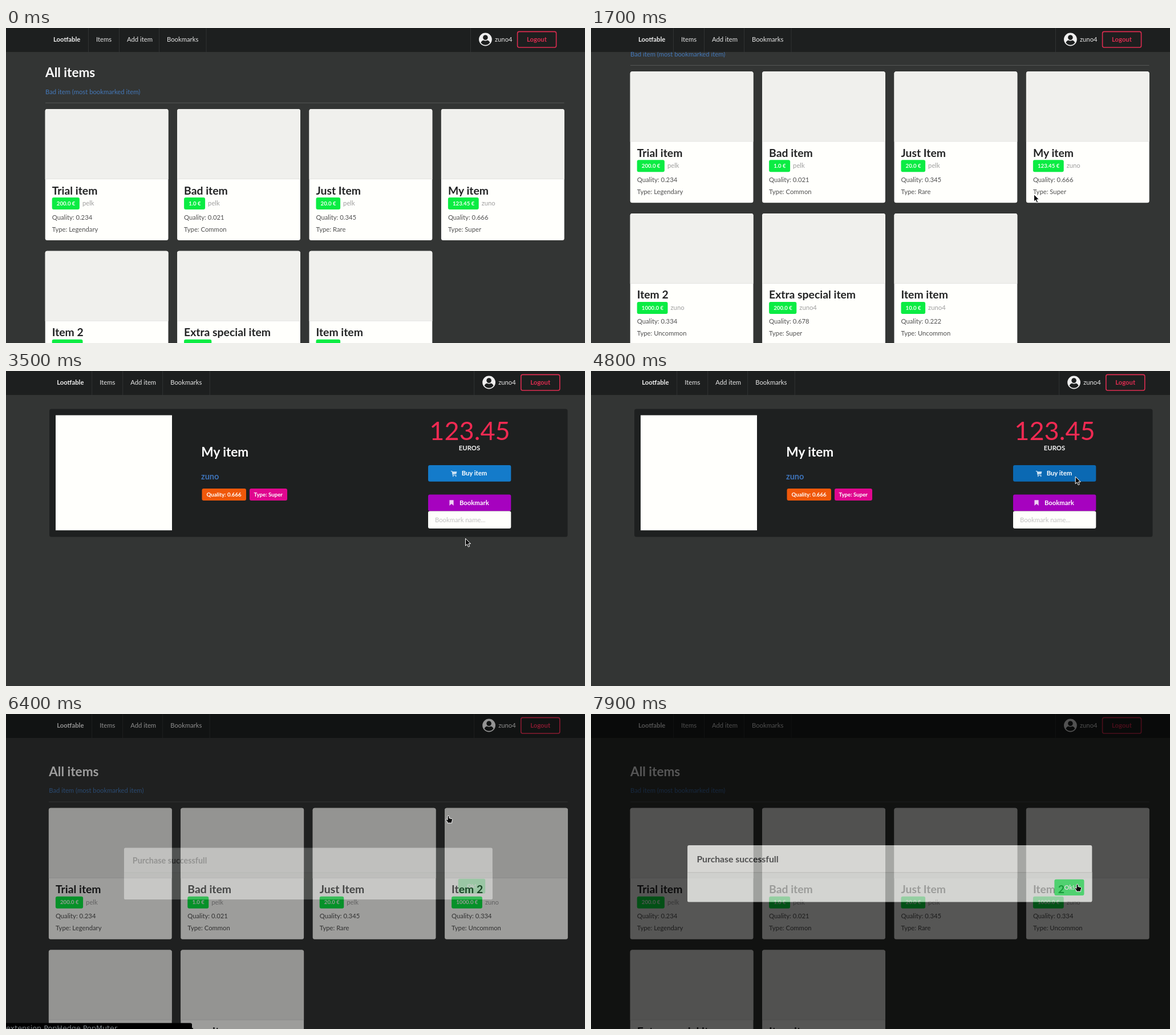
An HTML page for the animation above (8 s loop, 1015x552 px).

```html
<!DOCTYPE html>
<html lang="en">
<head>
<meta charset="utf-8">
<title>Item market</title>
<style>
  html, body { margin: 0; width: 100%; height: 100%; overflow: hidden; background: #333534; }
  svg { display: block; width: 1015px; height: 552px; }
  text { font-family: Lato, sans-serif; font-size: 11.28px; white-space: pre; }
  .b { font-weight: 700; }
  .mid { text-anchor: middle; }
  .h1 { font-size: 22.57px; }
  .h2 { font-size: 19.35px; }
  .h3 { font-size: 16.12px; }
  .h4 { font-size: 14.5px; }
  .tag { font-size: 9.67px; }
  .price { font-size: 45.1px; }
  #statusText { font-family: "DejaVu Sans", sans-serif; font-size: 12.75px; }
</style>
</head>
<body>
<svg id="stage" viewBox="0 0 1015 552" xmlns="http://www.w3.org/2000/svg"></svg>
<script>
const LOOP = 8000, STEP = 100, MAX_SCROLL = 68.7;
const PAGE = '#333534', INK = '#222324', LINK = '#2461b5', PAPER = '#fffffc';
const SHOP = 3300, BOUGHT = 6200, CLOSE = 7700;
const $ = id => document.getElementById(id);

const text = (x, y, str, fill, cls = '', extra = '') =>
  `<text x="${x}" y="${y}" fill="${fill}" class="${cls}" ${extra}>${str}</text>`;
const rect = (x, y, w, h, fill, r = 0, extra = '') =>
  `<rect x="${x}" y="${y}" width="${w}" height="${h}" fill="${fill}" rx="${r}" ${extra}/>`;

const ITEMS = [
  ['Trial item', '200.0', 'pelk', '0.234', 'Legendary'],
  ['Bad item', '1.0', 'pelk', '0.021', 'Common'],
  ['Just Item', '20.0', 'pelk', '0.345', 'Rare'],
  ['My item', '123.45', 'zuno', '0.666', 'Super'],
  ['Item 2', '1000.0', 'zuno', '0.334', 'Uncommon'],
  ['Extra special item', '200.0', 'zuno4', '0.678', 'Super'],
  ['Item item', '10.0', 'zuno4', '0.222', 'Uncommon']
];
const cardX = i => 68.7 + (i % 4) * 231.4;
const cardY = i => 142 + Math.floor(i / 4) * 248.7;

function card([name, price, seller, quality, type], i) {
  // label width: padding plus tabular digits, dot, space and euro sign
  const w = 16.1 + 9.67 * (0.58 * (price.length - 1) + 1);
  return `<g transform="translate(${cardX(i)} ${cardY(i)})">` +
    rect(0, 0, 215.8, 230, PAPER, 3.5) +
    `<path d="M0 122.5V3.5Q0 0 3.5 0H212.3Q215.8 0 215.8 3.5V122.5Z" fill="#f0f0ed"/>` +
    rect(0, 122, 215.8, 1, '#e3e3e1') +
    text(12, 149.5, name, INK, 'b h2 name') +
    rect(12, 155, w, 21, '#0bec43', 3) +
    text(20.1, 168.7, price + ' €', '#f4fff4', 'b tag') +
    text(12 + w + 5, 169, seller, '#9f9f9f') +
    text(12, 193.5, 'Quality: ' + quality, '#505050') +
    text(12, 214.5, 'Type: ' + type, '#505050') + '</g>';
}

const list = (id, items) => `<g id="${id}">` +
  text(69, 86, 'All items', '#fff', 'b h1') +
  text(69, 115.5, 'Bad item (most bookmarked item)', '#4478b9') +
  rect(69, 130.7, 909.5, 1, '#555756') + items.map(card).join('') + '</g>';

const nav = rect(0, 0, 1015, 42, '#1d1f1f') + '<g id="nav">' +
  [144.5, 198.5, 268.5, 351, 814.5].map(x => rect(x - 0.5, 0, 1, 42, '#313333')).join('') +
  text(83, 24, 'Lootfable', '#f0f0f0', 'b') +
  text(158, 24, 'Items', '#e6e6e6') + text(212, 24, 'Add item', '#e6e6e6') +
  text(282, 24, 'Bookmarks', '#e6e6e6') +
  `<circle cx="840.4" cy="20" r="11.4" fill="#f0f0f0"/>
   <circle cx="840.4" cy="16.6" r="4.3" fill="#1d1f1f"/>
   <path d="M832.4 25.6Q834 22 837 21.6Q840.4 23.4 843.8 21.6Q846.8 22 848.4 25.6A9.8 9.8 0 0 1 832.4 25.6Z" fill="#1d1f1f"/>` +
  text(857, 23.7, 'zuno4', '#e6e6e6') +
  rect(896.6, 6.4, 68, 27.6, 'none', 3, 'stroke="#dd2c50" stroke-width="1.6"') +
  text(930.5, 24, 'Logout', '#dd2c50', 'b mid') + '</g>';

const detail = '<g id="detail">' +
  rect(76, 66.4, 908.5, 224.3, '#1e2020', 3.5) +
  rect(87, 77.5, 204, 201.7, PAPER) +
  text(342.3, 149.6, 'My item', '#fff', 'b h1') +
  text(342, 190.3, 'zuno', '#3e73b8', 'b h4') +
  rect(343.5, 206, 77.5, 21, '#f0580a', 3) + text(351.5, 219.7, 'Quality: 0.666', '#fff', 'b tag') +
  rect(427, 206, 66, 21, '#e0078f', 3) + text(434.5, 219.7, 'Type: Super', '#fff', 'b tag') +
  text(813, 121, '123.45', '#f02a52', 'mid price') +
  text(812.5, 138.7, 'EUROS', '#f4f4f4', 'b mid') +
  rect(740, 165, 145.3, 28.8, '#147bca', 3, 'id="buy"') +
  `<g fill="#cfe4f5"><path d="M779.8 175H782.2L782.8 176.3H790.4L789.4 180.4L783.6 181.1L784 182H789.4V183H782.9L781.4 176H779.8Z"/>
   <circle cx="783.8" cy="184.2" r="1"/><circle cx="788.6" cy="184.2" r="1"/></g>` +
  text(798.7, 183.4, 'Buy item', '#fff', 'b') +
  rect(740, 216.4, 145.3, 29, '#a602bf', 3) +
  '<path d="M777.4 226.2H784.6V236L781 232.8L777.4 236Z" fill="#eed0f3"/>' +
  text(795, 234.8, 'Bookmark', '#fff', 'b') +
  rect(740, 245.4, 145.3, 30.6, PAPER, 3) +
  text(752, 264.8, 'Bookmark name...', '#c1c1c0') + '</g>';

const dimmer = `<g id="dimmer">${rect(0, 0, 1015, 552, '#000', 0, 'opacity=".85"')}<g id="modal">` +
  rect(-362.7, -50.8, 725.4, 101.6, PAPER, 3) +
  `<path d="M-362.7 -2H362.7V47.8Q362.7 50.8 359.7 50.8H-359.7Q-362.7 50.8 -362.7 47.8Z" fill="#f4f5f1"/>` +
  rect(-362.7, -2.5, 725.4, 1, '#d0d0ce') +
  text(-346, -20.3, 'Purchase successfull', INK, 'b h3') +
  rect(295.2, 10.2, 53.3, 29, '#1bf052', 3) + text(321.8, 28.6, 'Ok!', '#fff', 'b mid') + '</g></g>';

const status = '<g id="status"><path d="M0 541.5H323Q326 541.5 326 544.5V552H0Z" fill="#000"/>' +
  text(0, 555, '', '#80868a', '', 'id="statusText"') + '</g>';

const pointer = `<g id="pointer" stroke="#fff" stroke-width="1" stroke-linejoin="round" fill="#0a0a0a">
  <path id="arrow" d="M.5 .5V13.2L3.4 10.5L5.4 15.2L7.7 14.2L5.7 9.7H9.6Z"/>
  <path id="hand" d="M-1 .5Q.8 -.2 1 1.4V4.6L5.6 5.6Q7 6 6.6 7.8L5.6 10.4V13H-2.2V11L-5 7.6Q-5.2 6 -3.6 6.4L-2 7.6V1.5Q-2 .7 -1 .5Z"/></g>`;

$('stage').innerHTML = rect(0, 0, 1015, 552, PAGE) + list('before', ITEMS) +
  list('after', ITEMS.filter(([name]) => name !== 'My item')) + detail + nav + dimmer + status + pointer;
const names = [...document.querySelectorAll('#before .name')];

// pointer moves: start, end, x, y
const MOVES = [
  [300, 700, 652, 212], [1000, 1100, 671, 239], [1100, 1200, 714, 462], [1300, 1500, 776, 291],
  [2600, 2800, 805, 293], [3700, 3900, 801, 292], [4000, 4200, 704, 263], [4300, 4600, 859, 186],
  [4700, 5200, 760, 172], [5400, 5700, 776, 178], [7100, 7600, 853, 298]
];

const clamp = v => Math.min(1, Math.max(0, v));
function ease(t, from, to) {
  const k = clamp((t - from) / (to - from));
  return k * k * (3 - 2 * k);
}
const scroll = t => MAX_SCROLL * (ease(t, 100, 700) - ease(t, 1600, 2400));
const pointerAt = t => MOVES.reduce(([px, py], [from, to, x, y]) => {
  const k = ease(t, from, to);
  return [px + (x - px) * k, py + (y - py) * k];
}, [610, 572]);
const inside = ([px, py], x, y, w, h) => px >= x && px <= x + w && py >= y && py <= y + h;

// index of the title under the pointer, or -1
const hovered = t => t < SHOP
  ? ITEMS.findIndex((_, i) => inside(pointerAt(t), cardX(i) + 12, cardY(i) + 132 - scroll(t), 192, 23))
  : -1;

function statusAt(t) {
  if (t >= 5900 && t < 7000) return 'extension PopHedge PopMuter';
  // the address lingers for one step after the pointer leaves
  const i = Math.max(hovered(t), t < SHOP ? hovered(t - STEP) : -1);
  return i < 0 ? '' : 'a-marketplace.herokuapp.com/items/' + (i + 1);
}

const show = (id, on) => $(id).setAttribute('display', on ? 'inline' : 'none');
const move = (id, x, y, more = '') => $(id).setAttribute('transform', `translate(${x} ${y})${more}`);

function draw(t) {
  const bought = t >= BOUGHT, closing = t >= CLOSE;
  const dx = t >= SHOP && !closing ? 6.2 : 0;
  show('before', t < SHOP);
  show('detail', t >= SHOP && !bought);
  show('after', bought);
  move('before', 0, -scroll(t));
  move('after', dx, 22.8);
  move('nav', dx, 0);

  const over = hovered(t), point = pointerAt(t);
  names.forEach((el, i) => el.setAttribute('fill', i === over ? LINK : INK));
  $('buy').setAttribute('fill', inside(point, 740, 165, 145, 29) ? '#0b69b3' : '#147bca');

  const fade = closing ? 1 - (t - CLOSE) / 900 : 1 - (1 - clamp((t - 6300) / 385)) ** 2;
  const size = closing ? 0.9 + 0.1 * fade : 0.8 + 0.2 * fade;
  show('dimmer', fade > 0);
  $('dimmer').setAttribute('opacity', fade);
  $('modal').setAttribute('opacity', fade);
  move('modal', 523.7 + dx, 279.7, ` scale(${size})`);

  const note = statusAt(t);
  show('status', note);
  $('statusText').textContent = note;

  move('pointer', ...point);
  show('arrow', !bought);
  show('hand', bought);
}

const start = performance.now();
function tick() {
  const t = (performance.now() - start) % LOOP;
  draw(Math.floor(t / STEP) * STEP);
  requestAnimationFrame(tick);
}
draw(0);
requestAnimationFrame(tick);
</script>
</body>
</html>
```
